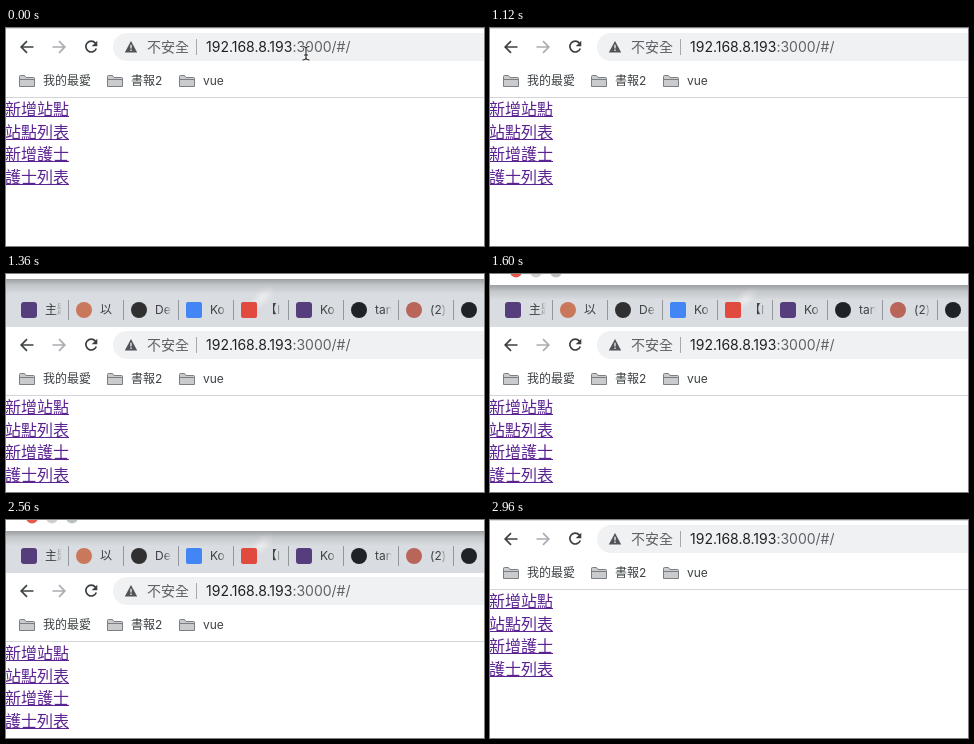
Write an HTML page that moves like this. It is 478 px wide and 218 px high and loops after 3040 ms.

```html
<!DOCTYPE html>
<html lang="zh-Hant">
<head>
<meta charset="utf-8">
<title>Browser window</title>
<style>
html, body { margin: 0; width: 100%; height: 100%; overflow: hidden; background: #fff; }
svg { display: block; width: 478px; height: 218px; }
text {
  font-family: Inter, "Noto Sans CJK TC", "Noto Sans CJK", sans-serif;
  font-feature-settings: "calt" 0;
  fill: #3c4043;
  white-space: pre;
}
.small { font-size: 12px; }
.address { font-size: 14px; }
.muted { fill: #5f6368; }
.links { fill: #5b2392; }
.links text { font-size: 16px; font-weight: 300; fill: inherit; }
.icons { fill: none; stroke: #3c4043; stroke-width: 1.7; }
.folder path { fill: #c9cbcd; stroke: #7b7f83; }

#window, #titlebar, #cursor { animation: 3040ms step-end infinite; }
#window { animation-name: reveal; }
#titlebar { animation-name: drop; }
#cursor { animation-name: leave; }
#pill { fill: #eff1f2; animation: hover 3040ms linear infinite; }

@keyframes reveal {
  0% { transform: translateY(0); }
  39.47% { transform: translateY(32px); }
  42.1% { transform: translateY(52px); }
  89.47% { transform: translateY(20px); }
  92.1%, 100% { transform: translateY(0); }
}
@keyframes drop {
  0% { transform: translateY(-30px); }
  44.73% { transform: translateY(-6px); }
  47.36% { transform: translateY(0); }
  89.47%, 100% { transform: translateY(-30px); }
}
@keyframes leave {
  0% { transform: translateY(0); visibility: visible; }
  2.63% { transform: translateY(-8px); visibility: visible; }
  5.26%, 100% { transform: translateY(-8px); visibility: hidden; }
}
@keyframes hover {
  0%, 2.6% { fill: #eff1f2; }
  7.9%, 28.9% { fill: #e6e8eb; }
  34.2%, 100% { fill: #eff1f2; }
}
</style>
</head>
<body>
<svg viewBox="0 0 478 218">
  <defs>
    <linearGradient id="shadow" x2="0" y2="1">
      <stop offset="0" stop-opacity=".28"/>
      <stop offset=".4" stop-opacity=".1"/>
      <stop offset="1" stop-opacity="0"/>
    </linearGradient>
    <radialGradient id="glow">
      <stop offset="0" stop-color="#fff" stop-opacity=".5"/>
      <stop offset="1" stop-color="#fff" stop-opacity="0"/>
    </radialGradient>
    <linearGradient id="fade">
      <stop offset="0" stop-color="#d9dce0" stop-opacity="0"/>
      <stop offset="1" stop-color="#d9dce0"/>
    </linearGradient>
    <g id="folder" class="folder">
      <path d="M.5 11.5V1.5Q.5.5 1.5.5H5.5L7 2.5H14.5Q15.5 2.5 15.5 3.5V11.5Z"/>
      <path d="M.5 4.5H15.5"/>
    </g>
    <path id="beam" fill="none" d="M296.5 18.5Q300 18.5 300 21V29.5Q300 32 296.5 32M303.5 18.5Q300 18.5 300 21M300 29.5Q300 32 303.5 32M298 27H302"/>
  </defs>

  <g id="window">
    <rect y="-52" width="478" height="53" fill="#d9dce0"/>
    <ellipse rx="16" ry="8" fill="url(#glow)" transform="translate(256 -28) rotate(-45)"/>
    <g id="tabs"></g>

    <rect y="1" width="478" height="217" fill="#fff"/>
    <rect y="69" width="478" height="1" fill="#d3d5d8"/>
    <rect id="pill" x="107" y="5" width="400" height="28" rx="14"/>

    <g class="icons">
      <path d="M27.5 19H16M21 13.2L15.2 19L21 24.8"/>
      <path d="M46.5 19H58M53 13.2L58.8 19L53 24.8" stroke="#a9acb0"/>
      <path d="M89.4 15.1A5.4 5.4 0 1 0 90.3 20.5"/>
    </g>
    <path d="M91.3 12.7V18.3H85.7Z" fill="#3c4043"/>

    <path d="M125 13L131.2 24.4H118.8Z" fill="#505458"/>
    <path d="M125 16.8V20.4M125 21.5V23" stroke="#eff1f2" stroke-width="1.3"/>
    <text class="muted" x="141" y="24" font-size="14">不安全</text>
    <rect x="190" y="11" width="1" height="16" fill="#a5a9ad"/>
    <text class="address" x="200" y="24" style="fill:#202124">192.168.8.193<tspan class="muted">:3000/#/</tspan></text>

    <use href="#folder" x="13" y="47"/>
    <text class="small" x="37" y="57">我的最愛</text>
    <use href="#folder" x="101" y="47"/>
    <text class="small" x="125" y="57">書報2</text>
    <use href="#folder" x="173" y="47"/>
    <text class="small" x="197" y="57">vue</text>

    <g class="links" id="links"></g>
  </g>

  <g id="titlebar">
    <rect y="11" width="478" height="15" fill="url(#shadow)"/>
    <rect y="-14" width="478" height="25" fill="#fff"/>
    <circle cx="26" cy="-2.6" r="6" fill="#e8574b"/>
    <circle cx="46" cy="-2.6" r="6" fill="#cfcfd1"/>
    <circle cx="66" cy="-2.6" r="6" fill="#bcc2be"/>
  </g>

  <g id="cursor">
    <use href="#beam" stroke="#fff" stroke-width="2.6"/>
    <use href="#beam" stroke="#222" stroke-width="1.1"/>
  </g>
</svg>
<script>
const svgNS = "http://www.w3.org/2000/svg";

function add(parent, name, attrs, content = "") {
  const el = document.createElementNS(svgNS, name);
  for (const key in attrs) el.setAttribute(key, attrs[key]);
  el.textContent = content;
  parent.append(el);
  return el;
}

const tabs = [
  ["主題", "#563d7c", 3], ["以", "#c9785c", 8], ["De", "#303030", 8],
  ["Ko", "#4285f4", 2], ["【I", "#e04a3f", 2], ["Ko", "#563d7c", 3],
  ["tan", "#1f2328", 8], ["(2)", "#b9655a", 8], ["", "#1f2328", 8]
];
const strip = document.getElementById("tabs");
tabs.forEach(([label, fill, rx], i) => {
  const x = 15 + i * 55;
  add(strip, "rect", { x, y: -24, width: 16, height: 16, rx, fill });
  // The nested viewport clips the label
  const box = add(strip, "svg", { x: x + 24, y: -28, style: "width:16.5px;height:24px", width: 16.5, height: 24 });
  add(box, "text", { class: "small", x: 0, y: 16.3 }, label);
  if (label.length > 1) add(strip, "rect", { x: x + 33, y: -26, width: 8, height: 20, fill: "url(#fade)" });
  add(strip, "rect", { x: x + 47, y: -26, width: 1, height: 20, fill: "#94989d" });
});

const links = document.getElementById("links");
["新增站點", "站點列表", "新增護士", "護士列表"].forEach((label, i) => {
  const y = 87.4 + i * 22.5;
  add(links, "text", { x: -1, y }, label);
  add(links, "rect", { x: 0, y: Math.round(y) + 1, width: 63, height: 1 });
});
</script>
</body>
</html>
```
